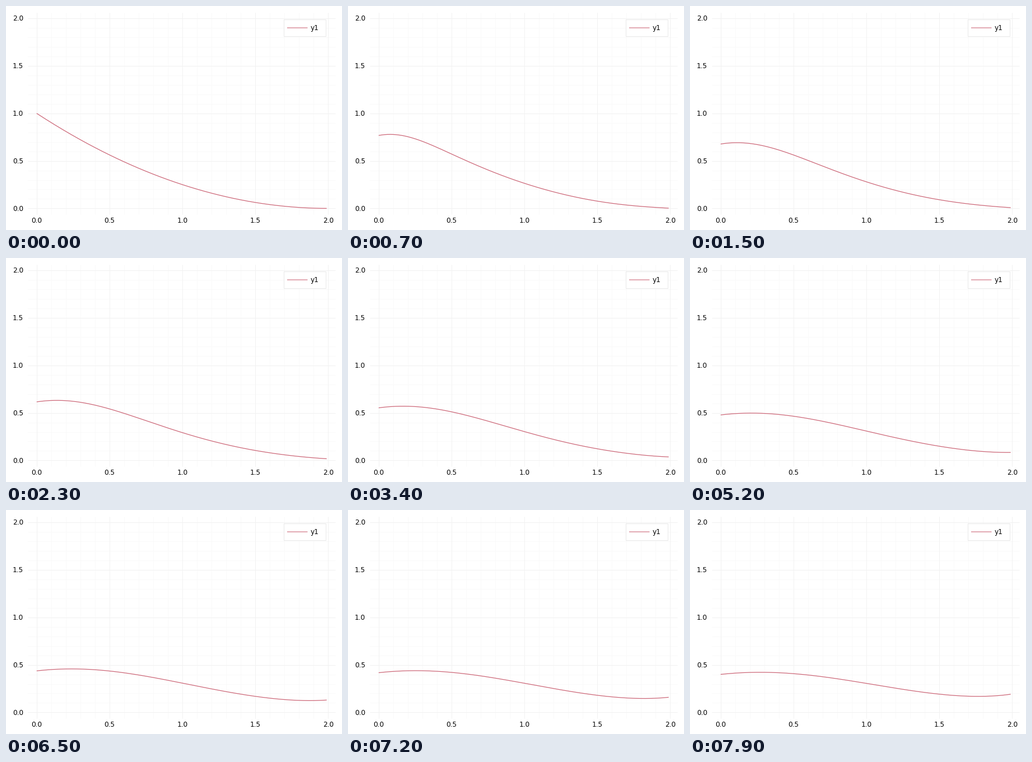
A matplotlib script that plays this animation: 600 by 400 pixels, repeating every 8 s.

```python
import numpy as np
import matplotlib.pyplot as plt
from matplotlib.animation import FuncAnimation
from matplotlib.patches import Rectangle

W, H, DPI = 600, 400, 100
FRAMES, INTERVAL = 80, 100
PX = 72 / DPI  # points per pixel

LEFT, RIGHT, TOP, BOTTOM = 39.2, 588.2, 11.8, 371.6
XLIM, YLIM = (-0.0597, 2.0497), (-0.06, 2.06)
ROSE = "#cc6677"

plt.rcParams["font.family"] = "DejaVu Sans"
plt.rcParams["font.size"] = 12.1 * PX


def sx(x):
    return LEFT + (x - XLIM[0]) / (XLIM[1] - XLIM[0]) * (RIGHT - LEFT)


def sy(y):
    return BOTTOM - (y - YLIM[0]) / (YLIM[1] - YLIM[0]) * (BOTTOM - TOP)


# Heat equation on [0, 2], implicit steps, moving values at both ends
N, SUB, DIFF = 201, 10, 0.04
x = np.linspace(0, 2, N)
dt = INTERVAL / 1000 / SUB
r = DIFF * dt / (x[1] - x[0]) ** 2


def left_value(t):
    s = np.sqrt(t)
    return np.exp(-s * (0.3125 + 0.0048 * s))


def right_value(t):
    return 0.0031 * t * t


def solve():
    step = (1 + 2 * r) * np.eye(N) - r * (np.eye(N, k=1) + np.eye(N, k=-1))
    for row in (0, -1):
        step[row] = 0
        step[row, row] = 1
    inv = np.linalg.inv(step)
    u = (1 - x / 2) ** 2
    out = [u]
    for k in range(1, (FRAMES - 1) * SUB + 1):
        u = u.copy()
        u[0], u[-1] = left_value(k * dt), right_value(k * dt)
        u = inv @ u
        if k % SUB == 0:
            out.append(u)
    return out


states = solve()

fig = plt.figure(figsize=(W / DPI, H / DPI), dpi=DPI, facecolor="white")
ax = fig.add_axes([0, 0, 1, 1])
ax.set_xlim(0, W)
ax.set_ylim(H, 0)
ax.axis("off")


def grid(values, color, z):
    for v in values:
        style = dict(color=color, lw=PX, zorder=z, solid_capstyle="butt")
        ax.plot([sx(v)] * 2, [TOP, BOTTOM], **style)
        ax.plot([LEFT, RIGHT], [sy(v)] * 2, **style)


grid(np.arange(21) / 10, "#f9f9f9", 1)
grid(np.arange(5) / 2, "#f1f1f1", 2)

for v in np.arange(5) / 2:
    ax.text(sx(v), 387.4, f"{v:.1f}", ha="center", va="baseline")
    ax.text(31.2, sy(v) + 4.5, f"{v:.1f}", ha="right", va="baseline")

curve, = ax.plot([], [], color=ROSE, lw=1.25 * PX, zorder=3,
                 solid_joinstyle="round", solid_capstyle="butt")

# Legend
ax.add_patch(Rectangle((495.5, 23.5), 75, 30, fc="white", ec="#e8e8e8",
                       lw=PX, zorder=4))
ax.plot([502, 538.5], [39, 39], color=ROSE, lw=1.1 * PX, zorder=5,
        solid_capstyle="butt", snap=False)
ax.text(544, 43.5, "y1", va="baseline", zorder=5)


def draw(i):
    curve.set_data(sx(x[:-1]), sy(states[i][:-1]))
    return curve,


anim = FuncAnimation(fig, draw, frames=FRAMES, interval=INTERVAL,
                     repeat=True, repeat_delay=0)
plt.show()
```
